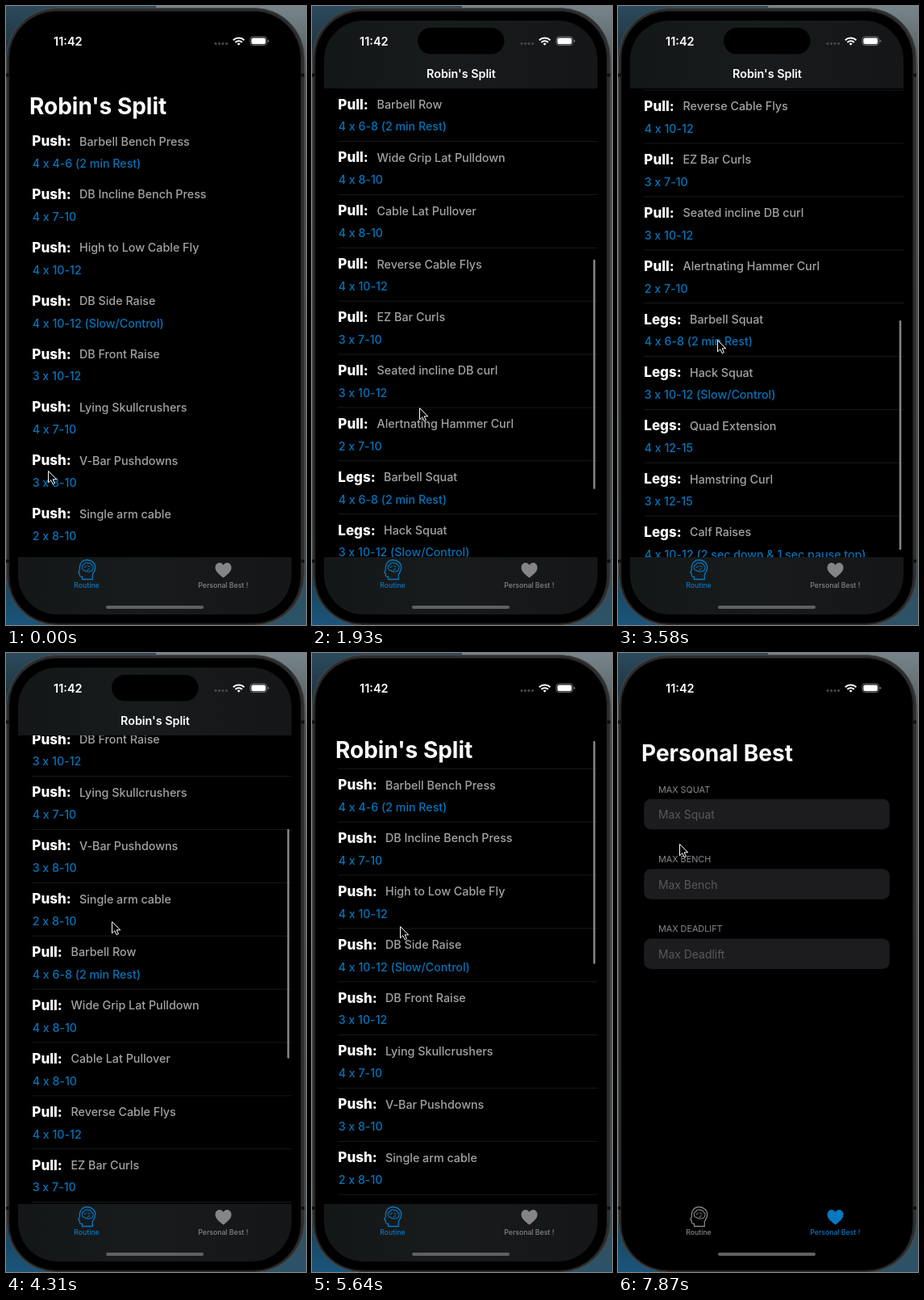
Write an HTML page that moves like this. It is 372 px wide and 766 px high and loops after 8 s.

```html
<!DOCTYPE html>
<html lang="en">
<head>
<meta charset="utf-8">
<title>Workout split</title>
<style>
html, body { margin: 0; width: 100%; height: 100%; overflow: hidden; background: #000; }
svg { display: block; width: 372px; height: 766px; }
text { font-family: Inter, "Open Sans", sans-serif; fill: #fff; white-space: pre; font-feature-settings: "calt" 0; }
.big { font-size: 28px; font-weight: 700; }
.day { font-size: 17px; font-weight: 800; }
.name { font-size: 14.3px; font-weight: 500; fill: #a3a3a5; }
.sets { font-size: 14.2px; font-weight: 500; fill: #0673b8; }
.bar { font-size: 14.3px; font-weight: 600; text-anchor: middle; }
.clock { font-size: 14.5px; font-weight: 600; font-feature-settings: "calt" 1; }
.head { font-size: 10.8px; fill: #8b8b90; }
.hint { font-size: 13.9px; fill: #58585c; }
.tab { color: #858587; }
.tab.on { color: #0878c0; }
.tab text { font-size: 8.7px; font-weight: 500; text-anchor: middle; fill: currentColor; }
</style>
</head>
<body>
<svg viewBox="0 0 372 766" xmlns="http://www.w3.org/2000/svg">
  <defs>
    <linearGradient id="wallL" x2="0" y2="1">
      <stop offset="0" stop-color="#2b4a5c"/><stop offset=".12" stop-color="#16262f"/>
      <stop offset=".85" stop-color="#14303f"/><stop offset="1" stop-color="#1b557a"/>
    </linearGradient>
    <linearGradient id="wallR" x2="0" y2="1">
      <stop offset="0" stop-color="#77858b"/><stop offset=".12" stop-color="#4b5254"/>
      <stop offset=".8" stop-color="#3d4a50"/><stop offset="1" stop-color="#2b5368"/>
    </linearGradient>
    <linearGradient id="glass" x2="1" y2="0">
      <stop offset="0" stop-color="#141718"/><stop offset=".45" stop-color="#181b1c"/>
      <stop offset="1" stop-color="#141617"/>
    </linearGradient>
    <clipPath id="screen"><rect x="15" y="18" width="339" height="735" rx="49"/></clipPath>
    <clipPath id="body"><rect x="15" y="102" width="339" height="580"/></clipPath>
  </defs>

  <rect width="186" height="766" fill="url(#wallL)"/>
  <rect x="186" width="186" height="766" fill="url(#wallR)"/>
  <rect x=".5" y="2.5" width="369.5" height="764" rx="62" fill="#2c2d2e" stroke="#4b4d4e"/>
  <path d="M0 85.500h4M366 85.500h4M0 687h4M366 687h4" stroke="#111" stroke-width="4"/>
  <rect x="4" y="6.500" width="361.500" height="757.500" rx="58" fill="#000" stroke="#161616"/>

  <g clip-path="url(#screen)">
    <g id="routine">
      <g clip-path="url(#body)"><g id="list"><text class="big" x="29" y="133.500">Robin's Split</text></g></g>
      <g id="nav">
        <rect x="15" y="18" width="339" height="84" fill="url(#glass)"/>
        <text class="bar" x="185" y="88.500">Robin's Split</text>
      </g>
      <rect x="15" y="682" width="339" height="71" fill="url(#glass)"/>
      <rect id="thumb" x="348.700" width="2.600" rx="1.300" fill="#838385"/>
    </g>
    <g id="best"><text class="big" x="29" y="133.500">Personal Best</text></g>
  </g>

  <rect x="131" y="27" width="107.500" height="32.500" rx="16.250" fill="#000"/>
  <text class="clock" x="59" y="48.800">11:42</text>
  <path d="M260 46.500h.01M264.500 46.500h.01M269 46.500h.01M273.500 46.500h.01" stroke="#48484a" stroke-width="3.200" stroke-linecap="round"/>
  <g fill="none" stroke="#fff" stroke-width="2.100">
    <path d="M281.800 42.300a9.700 9.700 0 0 1 13.600 0M284.400 45a6 6 0 0 1 8.400 0"/>
    <path d="M288.600 48.800l-2-2.100a2.900 2.900 0 0 1 4 0z" fill="#fff" stroke="none"/>
  </g>
  <rect x="302.900" y="38" width="20.500" height="10.600" rx="3.400" fill="none" stroke="#747476"/>
  <rect x="304.300" y="39.400" width="17.700" height="7.800" rx="2.200" fill="#fff"/>
  <path d="M324.700 41.500q1.500.4 1.500 1.800t-1.500 1.800z" fill="#747476"/>

  <g id="tabA" class="tab">
    <g fill="none" stroke="currentColor" stroke-width="1.300" stroke-linecap="round" stroke-linejoin="round">
      <path d="M94.500 709.500v-3.300q-3.100.5-3.200-2v-2.200l-1.700-.8 1.800-3.700c-.8-7 3-12 9-12c6 0 10.300 4 10.300 9.600c0 4-2.200 6.200-3.400 8.200v6.200z"/>
      <path d="M94.500 696.500c-1-3 .4-5 2.200-5.200c.5-2.600 3.600-3.200 5-1.600c2-1 4.200.2 4.400 2.200c2.200.8 2.600 3.400 1.300 4.800c.2 2-1.400 3-3 2.600c-.8 1.200-2.600 1.200-3.500.2c-1.200.7-2.700.2-3-1.200q-2 .7-3.400-1.800z" stroke-width="1.100"/>
      <path d="M97 694.500q2 .8 2.400-1.500M101.700 692.500q.5 2 2.500 1.700M101 698.500q.2-2.200 2.500-2" stroke-width="1"/>
    </g>
    <text x="100" y="720">Routine</text>
  </g>
  <g id="tabB" class="tab">
    <path d="M269.500 707.500c-6-4.200-10-8-10-12.700c0-3.500 2.400-5.900 5.300-5.900c2 0 3.700 1.100 4.700 2.900c1-1.800 2.700-2.900 4.700-2.900c2.900 0 5.300 2.400 5.300 5.900c0 4.700-4 8.500-10 12.700z" fill="currentColor"/>
    <text x="269.300" y="720">Personal Best !</text>
  </g>
  <rect x="124" y="742" width="121" height="4" rx="2" fill="#5f6062"/>
  <path id="cursor" d="M.5.5v14.300l3.300-3.100 2.300 5 2.300-1-2.200-4.900h4.500z" fill="#000" stroke="#fff" stroke-linejoin="round"/>
</svg>
<script>
const LOOP = 8000, STEP = 148.6, PITCH = 65.87;
const $ = id => document.getElementById(id);

function add(parent, tag, attrs, label) {
  const el = document.createElementNS("http://www.w3.org/2000/svg", tag);
  for (const key in attrs) el.setAttribute(key, attrs[key]);
  if (label) el.textContent = label;
  parent.appendChild(el);
  return el;
}

const days = [
  ["Push:", 91, [
    "Barbell Bench Press|4 x 4-6 (2 min Rest)", "DB Incline Bench Press|4 x 7-10",
    "High to Low Cable Fly|4 x 10-12", "DB Side Raise|4 x 10-12 (Slow/Control)",
    "DB Front Raise|3 x 10-12", "Lying Skullcrushers|4 x 7-10",
    "V-Bar Pushdowns|3 x 8-10", "Single arm cable|2 x 8-10"]],
  ["Pull:", 80.5, [
    "Barbell Row|4 x 6-8 (2 min Rest)", "Wide Grip Lat Pulldown|4 x 8-10",
    "Cable Lat Pullover|4 x 8-10", "Reverse Cable Flys|4 x 10-12",
    "EZ Bar Curls|3 x 7-10", "Seated incline DB curl|3 x 10-12",
    "Alertnating Hammer Curl|2 x 7-10"]],
  ["Legs:", 89, [
    "Barbell Squat|4 x 6-8 (2 min Rest)", "Hack Squat|3 x 10-12 (Slow/Control)",
    "Quad Extension|4 x 12-15", "Hamstring Curl|3 x 12-15",
    "Calf Raises|4 x 10-12 (2 sec down & 1 sec pause top)"]]
];

const list = $("list");
const lines = add(list, "g", { fill: "#19191b" });
const addLine = y => add(lines, "rect", { x: 32, y, width: 322, height: 1 });
let y = 167.2;
addLine(y - 20.5);
for (const [day, x, moves] of days) {
  for (const move of moves) {
    const [name, sets] = move.split("|");
    add(list, "text", { class: "day", x: 32.3, y: y + 5.9 }, day);
    add(list, "text", { class: "name", x, y: y + 5.3 }, name);
    add(list, "text", { class: "sets", x: 32.7, y: y + 32.8 }, sets);
    addLine(y + 45.4);
    y += PITCH;
  }
}

["Squat", "Bench", "Deadlift"].forEach((lift, i) => {
  const top = 180.8 + i * 86.4, label = "Max " + lift;
  add($("best"), "text", { class: "head", x: 50, y: top - 8.3 }, label.toUpperCase());
  add($("best"), "rect", { x: 32.3, y: top, width: 304.5, height: 37.5, rx: 8.5, fill: "#1c1c1e" });
  add($("best"), "text", { class: "hint", x: 50, y: top + 24.3 }, label);
});

// Keys: step, value(s)
const scrollKeys = [
  [0, 0], [1, 25], [3, 200], [5, 370], [8, 500], [13, 572.5], [16, 590], [19, 680],
  [22, 780], [24, 767.6], [26, 640], [29, 324], [31, 230], [34, 70], [36, 20],
  [38, 4], [43, -1], [45, 0]
];
const cursorKeys = [
  [0, 52, 575], [2, 90, 520], [4, 125, 330], [6, 130, 300], [8, 128, 330], [11, 133, 480],
  [13, 133, 497], [15, 133, 480], [19, 125, 400], [22, 122, 400], [24, 123, 413],
  [26, 125, 530], [28, 131, 340], [29, 131, 332], [32, 125, 480], [35, 112, 500],
  [38, 109, 338], [41, 150, 480], [43, 218, 621], [45, 268, 698], [47, 268, 698],
  [50, 79, 332], [51, 79, 332], [53, 76, 236]
];
const PRESS = 47;

function at(keys, k) {
  const i = keys.findIndex(key => key[0] >= k);
  if (i < 0) return keys[keys.length - 1].slice(1);
  if (i === 0) return keys[0].slice(1);
  const a = keys[i - 1], b = keys[i], p = (k - a[0]) / (b[0] - a[0]);
  return a.slice(1).map((v, j) => v + (b[j + 1] - v) * p);
}
const clamp = v => Math.max(0, Math.min(1, v));
const show = (el, on) => el.setAttribute("visibility", on ? "visible" : "hidden");

function draw(time) {
  const k = Math.floor((time + 12) / STEP);
  const [s] = at(scrollKeys, k), [cx, cy] = at(cursorKeys, k);
  const best = k >= PRESS;
  $("routine").style.display = best ? "none" : "";
  $("best").style.display = best ? "" : "none";
  $("tabA").classList.toggle("on", !best);
  $("tabB").classList.toggle("on", best);
  list.setAttribute("transform", `translate(0 ${-s})`);
  show(lines, k > 0);
  $("nav").setAttribute("opacity", clamp((s - 34) / 12));
  show($("thumb"), k > 0 && k < 45);
  $("thumb").setAttribute("y", Math.max(109, 92.8 + 0.386 * s));
  $("thumb").setAttribute("height", 275 + 9 * clamp(s / 46));
  $("cursor").setAttribute("transform", `translate(${cx} ${cy})`);
}

const start = performance.now();
function tick() {
  draw((performance.now() - start) % LOOP);
  requestAnimationFrame(tick);
}
tick();
</script>
</body>
</html>
```
